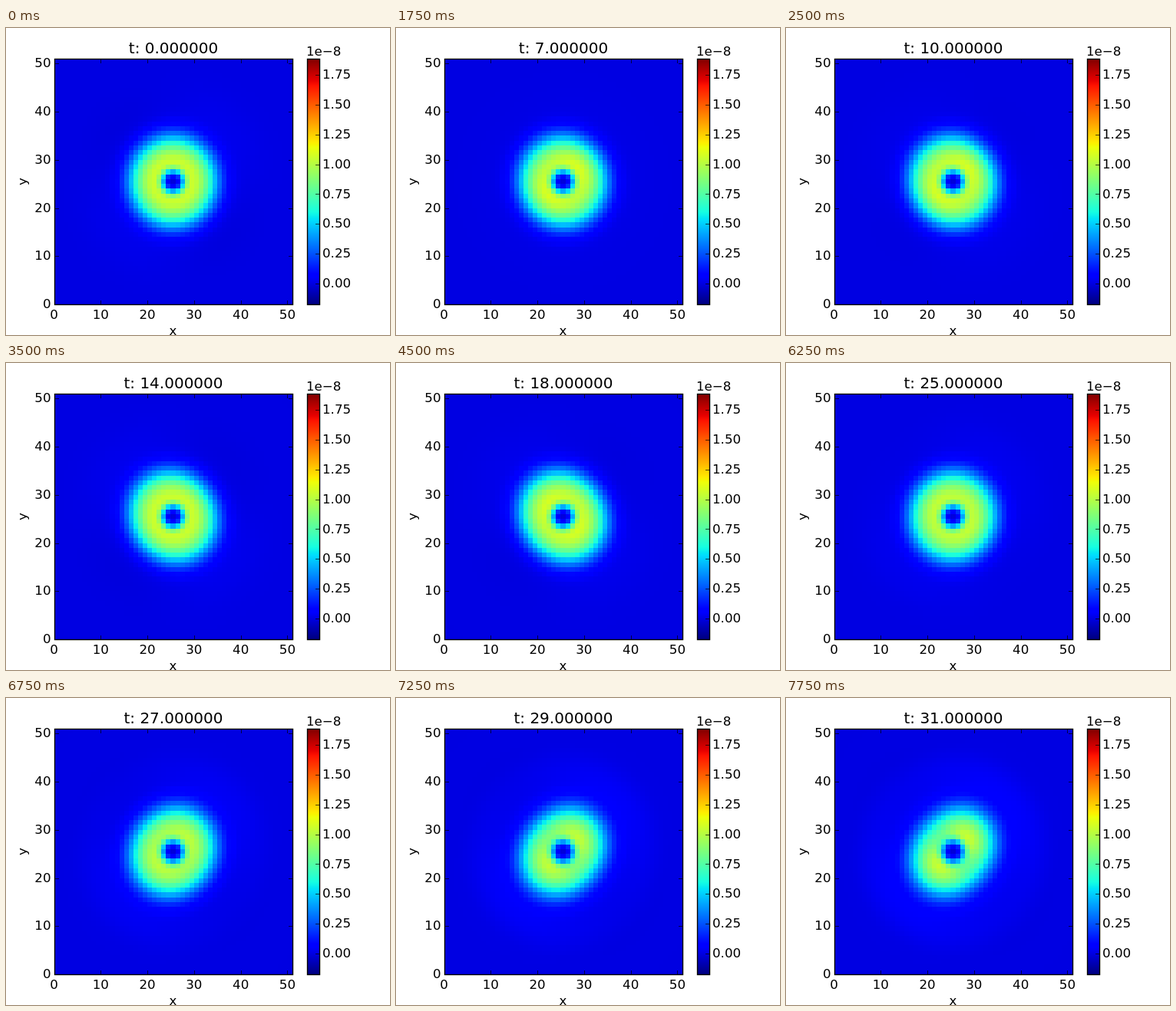
An HTML page with a canvas that plays this animation: 500 by 400 pixels, repeating every 8 s.

```html
<!DOCTYPE html>
<html lang="en">
<head>
<meta charset="utf-8">
<title>Ring field</title>
<style>
html, body { margin: 0; width: 100%; height: 100%; overflow: hidden; background: #fff; }
canvas, svg { position: absolute; left: 0; top: 0; width: 500px; height: 400px; }
text { font-family: "DejaVu Sans", sans-serif; font-size: 16.67px; fill: #000; }
#title { font-size: 20px; }
path, rect { fill: none; stroke: #000; stroke-width: 1.39; }
.tick { stroke-width: .7; }
</style>
</head>
<body>
<canvas id="field" width="500" height="400"></canvas>
<svg id="axes" viewBox="0 0 500 400"></svg>
<script>
const N = 51, LEFT = 62.5, TOP = 40, W = 310, H = 320;
const STEP = 250, STEPS = 32;
const V_MIN = -0.174, V_MAX = 1.885;
const ctx = document.getElementById('field').getContext('2d');
const svg = document.getElementById('axes');

const clamp = v => Math.max(0, Math.min(1, v));
const smooth = (a, b, v) => {
  const u = clamp((v - a) / (b - a));
  return u * u * (3 - 2 * u);
};
const bell = (r, size, power) => Math.exp(-((r / size) ** power));
const snap = v => Math.floor(v + .5) + .5;

function jet(n) {
  n = clamp(n);
  const r = n < .89 ? (n - .35) / .31 : 1 - (n - .89) / .22;
  const g = n < .5 ? (n - .125) / .25 : 1 - (n - .64) / .27;
  const b = n < .2 ? .5 + n / .22 : 1 - (n - .34) / .31;
  return `rgb(${[r, g, b].map(c => Math.round(255 * clamp(c)))})`;
}

// the ring leans to one side, swings to the other, then fades into a wide disc
function pose(t) {
  const late = smooth(22, 32, t);
  return {
    gain: 1 - .13 * late,
    scale: 1 - .025 * late,
    halo: .032 * late,
    lean: -.05 * smooth(0, 20, t) + .11 * smooth(20, 30, t),
    lobes: .035 * Math.sin(2 * Math.PI * t / 28) + .11 * smooth(23, 33, t),
    far: .012 * Math.cos(2 * Math.PI * t / 29)
  };
}

// radius in cells, result in 1e-8
function value(x, y, p) {
  const r = Math.hypot(x, y), s = Math.sin(2 * Math.atan2(y, x));
  const q = r / (1 + smooth(2, 8, r) * (p.scale - 1 + p.lean * s));
  const ring = 1.1 * (1 - bell(q, 2.58, 3)) * bell(q, 9.3, 3.8) + .02 * bell(q, 15, 2);
  const lobes = p.gain + smooth(1, 4, r) * p.lobes * s;
  const disc = p.halo * smooth(8, 13, r) * (1 - smooth(16, 23, r));
  return ring * lobes + disc + p.far * s * bell(r - 16, 5, 2) - .03 * bell(r, .8, 2);
}

function drawField(step) {
  const p = pose(step);
  const px = i => Math.round(LEFT + i * W / N);
  const py = j => Math.round(TOP + H - j * H / N);
  for (let j = 0; j < N; j++) {
    for (let i = 0; i < N; i++) {
      const v = value(i - 25, j - 25, p);
      ctx.fillStyle = jet((v - V_MIN) / (V_MAX - V_MIN));
      ctx.fillRect(px(i), py(j + 1), px(i + 1) - px(i), py(j) - py(j + 1));
    }
  }
}

function drawBar() {
  for (let y = 0; y < H; y++) {
    ctx.fillStyle = jet(1 - (y + .5) / H);
    ctx.fillRect(392, TOP + y, 16, 1);
  }
}

function add(tag, attrs, label) {
  const el = document.createElementNS('http://www.w3.org/2000/svg', tag);
  for (const k in attrs) el.setAttribute(k, attrs[k]);
  if (label !== undefined) el.textContent = label;
  svg.append(el);
  return el;
}
const write = (x, y, label, anchor = 'middle') =>
  add('text', { x, y: Math.round(y), 'text-anchor': anchor }, label);
const tick = d => add('path', { d, class: 'tick' });

function drawAxes() {
  for (let n = 0; n < N; n += 10) {
    const x = LEFT + n * W / N, y = TOP + H - n * H / N;
    tick(`M${snap(x)} 360.5v-5.5M${snap(x)} 40.5v5.5`);
    tick(`M63.5 ${snap(y)}h5.5M373.5 ${snap(y)}h-5.5`);
    write(x, 379, n);
    write(58.5, y + 5.2, n, 'end');
  }
  for (let v = 0; v < 2; v += .25) {
    const y = TOP + H * (V_MAX - v) / (V_MAX - V_MIN);
    tick(`M408.5 ${snap(y)}h-5.5`);
    write(412, y + 5.2, v.toFixed(2), 'start');
  }
  add('rect', { x: 63.5, y: 40.5, width: W, height: H });
  add('rect', { x: 392.5, y: 40.5, width: 16, height: H });
  write(391, 36, '1e−8', 'start');
  write(217.5, 400, 'x');
  write(0, 0, 'y').setAttribute('transform', 'translate(26.5 200) rotate(-90)');
}

drawBar();
drawAxes();
const title = write(218, 33, '');
title.id = 'title';

const start = performance.now();
let shown = -1;
function frame() {
  const step = Math.floor((performance.now() - start) / STEP) % STEPS;
  if (step !== shown) {
    shown = step;
    drawField(step);
    title.textContent = `t: ${step.toFixed(6)}`;
  }
  requestAnimationFrame(frame);
}
frame();
</script>
</body>
</html>
```
